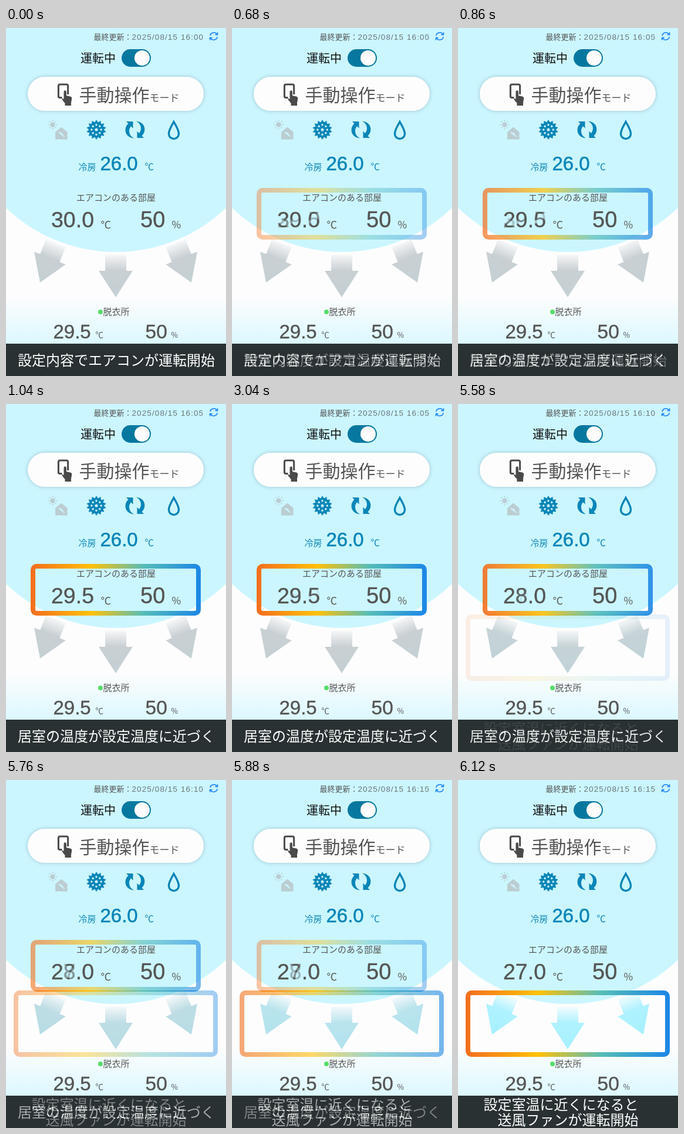
An HTML page that plays this animation: 375 by 592 pixels, repeating every 8000 ms.

```html
<!DOCTYPE html>
<html lang="ja">
<head>
<meta charset="utf-8">
<style>
  html, body { margin: 0; width: 100%; height: 100%; overflow: hidden; }
  svg { display: block; width: 375px; height: 592px; font-family: "Noto Sans CJK JP", "Noto Sans CJK", sans-serif; }
  text { fill: #555; font-weight: 300; white-space: pre; }
  .num { font-family: "Liberation Sans", Arial, sans-serif; font-weight: 400; stroke: #555; stroke-width: .4; }
  .blue { fill: #0a86b8; }
  .num.blue { stroke: #0a86b8; stroke-width: .6; }
  .line { fill: none; stroke: #0a86b8; stroke-width: 3.4; }
  .caption { fill: #fff; font-weight: 400; }
  .clock { font-family: "Liberation Sans", Arial, sans-serif; font-weight: 400; letter-spacing: 1.1px; fill: #6c757a; }
</style>
</head>
<body>
<svg id="stage" viewBox="0 0 375 592"></svg>
<script>
const stage = document.getElementById('stage');

const text = (x, y, size, s, cls = '') =>
  `<text x="${x}" y="${y}" font-size="${size}" class="${cls}">${s}</text>`;

const stops = list => list.map(([o, c]) => `<stop offset="${o}" stop-color="${c}"/>`).join('');

const arrowFill = (id, list) =>
  `<linearGradient id="${id}" gradientUnits="userSpaceOnUse" x1="0" y1="-72" x2="0" y2="0">${stops(list)}</linearGradient>`;

const polar = (cx, cy, r, a) =>
  `${(cx + r * Math.sin(a)).toFixed(2)},${(cy - r * Math.cos(a)).toFixed(2)}`;

const ring = (n, f) => Array.from({ length: n }, (_, i) => f(i / n * 2 * Math.PI, i)).join(' ');

function sunHouse() {
  const rays = ring(8, a => `M${polar(79.5, 164.5, 6, a)}L${polar(79.5, 164.5, 8.3, a)}`);
  return `<g fill="#bccdd2"><circle cx="79.5" cy="164.5" r="4.3"/>
    <path d="${rays}" stroke="#bccdd2" stroke-width="1.6"/>
    <path d="M84 189.5V177L94.5 168.5L104.5 177V189.5Z"/>
    <path d="M88 177L95 178L101 187Z" fill="#cbf6ff"/></g>`;
}

function snow() {
  const star = ring(28, (a, i) => polar(154, 173, i % 2 ? 12.8 : 17, a));
  const dots = ring(8, a => {
    const [x, y] = polar(154, 173, 8.2, a).split(',');
    return `<circle cx="${x}" cy="${y}" r="1.7"/>`;
  });
  return `<polygon class="blue" points="${star}"/>
    <g fill="#cbf6ff">${dots}<circle cx="154" cy="173" r="2.5"/></g>`;
}

function cycle() {
  const half = 'M222 158.5C238 160 240 176 231.5 183.5L235 187H223.5V175.5L227 179C232 173 231 163 222 158.5Z';
  return `<path class="blue" d="${half}"/><path class="blue" d="${half}" transform="rotate(180 220 173)"/>`;
}

const hand = `<path d="M95.5 118.5H92a2.6 2.6 0 0 1-2.6-2.6V98.5a2.6 2.6 0 0 1 2.6-2.6h11a2.6 2.6 0 0 1 2.6 2.6V113"
    fill="none" stroke="#4a4a4a" stroke-width="3"/>
  <path d="M98.5 108.5a2.2 2.2 0 0 1 4.4 0V115L110 116.5Q112.5 117.3 112.3 120L111 127V132H100.5V128L95.3 121.5Q95 119 98.5 121Z"
    fill="#4a4a4a"/>`;

const sync = `<g fill="none" stroke="#1f86f5" stroke-width="1.6">
  <path d="M347.8 13A6.6 6.6 0 0 1 360 11.2M360.4 15A6.6 6.6 0 0 1 348.2 16.8"/>
  <path d="M360.6 7.2V11.4H356.4M347.6 20.8V16.6H351.8"/></g>`;

const defs = `<defs>
  <linearGradient id="floor" x1="0" y1="0" x2="0" y2="1">
    ${stops([[0, '#fdfdfd'], [.77, '#fdfdfd'], [.91, '#dbf8ff'], [1, '#cbf6ff']])}</linearGradient>
  <linearGradient id="rainbow">
    ${stops([[0, '#f3701e'], [.35, '#ffc107'], [.67, '#55bdb8'], [1, '#1e88e5']])}</linearGradient>
  ${arrowFill('idle', [[0, '#f5f6f7'], [.37, '#c9d0d3'], [1, '#c4d0d4']])}
  ${arrowFill('blow', [[0, '#f2fcfe'], [.37, '#b0f2ff'], [1, '#a6f0ff']])}
  <filter id="soft" x="-10%" y="-40%" width="120%" height="180%">
    <feDropShadow dx="0" dy="0" stdDeviation="3" flood-color="#456" flood-opacity=".35"/></filter>
  <path id="arrow" d="M-18-72H18V-45H29L0 0L-29-45H-18Z"/>
  <g id="base">
    <rect width="375" height="592" fill="url(#floor)"/>
    <circle cx="187.5" cy="109" r="272" fill="#cbf6ff"/>
    ${text(149.5, 20, 13, '最終更新：')}${sync}
    <text x="127" y="58.5" font-size="20" style="fill:#111;font-weight:400">運転中</text>
    <rect x="197" y="36" width="50" height="30" rx="15" fill="#0678a0"/>
    <circle cx="232" cy="51" r="13" fill="#fdfdfd"/>
    <rect x="37" y="83" width="300" height="58" rx="29" fill="#fdfdfd" filter="url(#soft)"/>
    ${hand}${text(124.5, 125, 30, '手動操作')}${text(244.5, 125, 17, 'モード')}
    ${sunHouse()}${snow()}${cycle()}
    <path class="line" d="M286 159.5C282 167 277.5 173 277.5 180a8.5 8.5 0 0 0 17 0C294.5 173 290 167 286 159.5Z"/>
    ${text(123.5, 242, 15, '冷房', 'blue')}${text(160.5, 242, 33, '26.0', 'num blue')}${text(236.5, 242, 15.5, '℃', 'blue')}
    ${text(120, 293.5, 15, 'エアコンのある部屋')}
    ${text(161.5, 341, 17.5, '℃')}${text(229, 339, 38, '50', 'num')}${text(282.5, 341, 17, '%')}
    <circle cx="161" cy="483" r="4" fill="#58dd6a"/>${text(165.5, 488, 15, '脱衣所')}
    ${text(80.5, 528, 33, '29.5', 'num')}${text(152.5, 527, 13.5, '℃')}
    ${text(237.5, 528, 33.5, '50', 'num')}${text(281.5, 527, 12.5, '%')}
    <rect y="537" width="375" height="55" fill="#293133"/>
  </g>
</defs>`;

const frame = (x, y, w, h) =>
  `<rect x="${x}" y="${y}" width="${w}" height="${h}" rx="6" fill="none" stroke="url(#rainbow)" stroke-width="8"/>`;
const roomFrame = frame(46, 276, 282, 80);
const fanFrame = frame(17, 362, 340, 105);

const arrows = fill => ['58,433) rotate(22', '187,458', '316,433) rotate(-22']
  .map(t => `<use href="#arrow" fill="url(#${fill})" transform="translate(${t})"/>`).join('');

const caption = (x, y, s) => text(x, y, 24, s, 'caption');
const nearing = caption(20, 574, '居室の温度が設定温度に近づく');

// Each scene is opaque and fades in over the one before it.
const scenes = [
  { at: -1000, time: '16:00', temp: '30.0', fan: 'idle', extra: caption(20, 574, '設定内容でエアコンが運転開始') },
  { at: 500, time: '16:05', temp: '29.5', fan: 'idle', extra: roomFrame + nearing },
  { at: 3040, time: '16:10', temp: '28.0', fan: 'idle', extra: roomFrame + nearing },
  { at: 5580, time: '16:15', temp: '27.0', fan: 'blow',
    extra: fanFrame + caption(43.5, 561, '設定室温に近くになると') + caption(67.5, 587, '送風ファンが運転開始') },
];

stage.innerHTML = defs + scenes.map(s => `<g class="scene"><use href="#base"/>
  ${text(214.5, 20, 13.5, '2025/08/15 ' + s.time, 'clock')}
  ${text(77, 339, 37.5, s.temp, 'num')}${arrows(s.fan)}${s.extra}</g>`).join('');

const layers = stage.querySelectorAll('.scene');
const start = performance.now();

function draw() {
  const t = (performance.now() - start) % 8000;
  scenes.forEach((s, i) => {
    const step = Math.floor((t - s.at) / 60) + 1;
    layers[i].setAttribute('opacity', Math.max(0, Math.min(10, step)) / 10);
  });
  requestAnimationFrame(draw);
}
draw();
</script>
</body>
</html>
```
